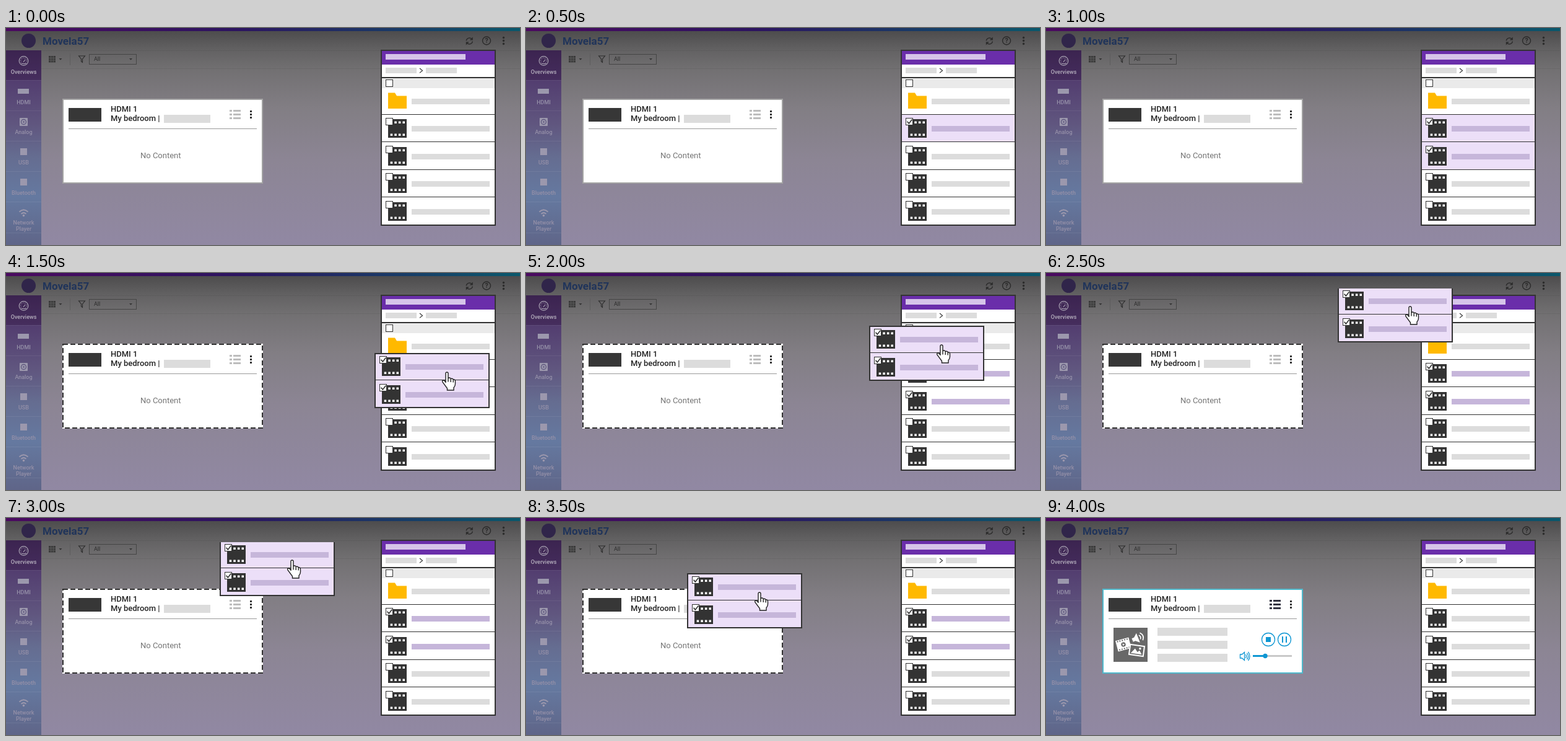
Recreate the animation shown at these times as an HTML page. Size 830x350 px, loop 6000 ms.

```html
<!DOCTYPE html>
<html lang="en">
<head>
<meta charset="utf-8">
<title>Drag files to a zone</title>
<style>
html, body { margin: 0; width: 100%; height: 100%; overflow: hidden; }
svg { display: block; width: 830px; height: 350px; font-family: Roboto, sans-serif; }
.line { fill: none; stroke: #2b2b2b; stroke-width: 1.4; }
</style>
</head>
<body>
<svg id="stage" viewBox="0 0 830 350" xmlns="http://www.w3.org/2000/svg">
  <defs>
    <linearGradient id="strip">
      <stop offset="0" stop-color="#4b0a60"/><stop offset=".45" stop-color="#2c1460"/><stop offset="1" stop-color="#0a586c"/>
    </linearGradient>
    <linearGradient id="page" gradientUnits="userSpaceOnUse" x1="0" y1="5" x2="0" y2="350">
      <stop offset="0" stop-color="#4d4c4d"/><stop offset=".09" stop-color="#636263"/>
      <stop offset=".18" stop-color="#727072"/><stop offset=".36" stop-color="#827e84"/>
      <stop offset=".6" stop-color="#8c8594"/><stop offset="1" stop-color="#9188a3"/>
    </linearGradient>
    <linearGradient id="side" gradientUnits="userSpaceOnUse" x1="0" y1="36" x2="0" y2="350">
      <stop offset="0" stop-color="#412b57"/><stop offset=".16" stop-color="#533e70"/>
      <stop offset=".38" stop-color="#60567f"/><stop offset=".55" stop-color="#656d91"/>
      <stop offset=".75" stop-color="#6579a0"/><stop offset="1" stop-color="#5f6588"/>
    </linearGradient>
  </defs>

  <rect width="830" height="350" fill="url(#page)"/>
  <rect width="830" height="5" fill="url(#strip)"/>
  <path d="M57 36.5H830M57 65.5H830" stroke="#000" stroke-opacity=".06"/>
  <circle cx="36.500" cy="20.500" r="11.500" fill="#30254a"/>
  <text x="59" y="27" font-size="17" font-weight="700" fill="#20345a">Movela57</text>

  <!-- header tools -->
  <g class="line">
    <path d="M743.300 20.500a5 5 0 0 1 8.500-3M753.300 21.500a5 5 0 0 1-8.500 3"/>
    <circle cx="776" cy="20.500" r="6.500"/>
  </g>
  <path d="M753.800 14.500v5h-5zM742.800 27.500v-5h5z" fill="#2b2b2b"/>
  <text x="776" y="24.300" font-size="10.500" font-weight="700" text-anchor="middle" fill="#2b2b2b">?</text>
  <g fill="#2b2b2b"><circle cx="803.500" cy="15.500" r="1.700"/><circle cx="803.500" cy="20.500" r="1.700"/><circle cx="803.500" cy="25.500" r="1.700"/></g>

  <!-- toolbar -->
  <rect x="69" y="45" width="11" height="10.500" fill="#3a3a3a"/>
  <path d="M72.700 45v10.500M76.300 45v10.500M69 48.500h11M69 52h11" stroke="#666" stroke-width=".7"/>
  <path d="M85.500 49h5l-2.500 2.800zM199 49h5l-2.500 2.800z" fill="#333"/>
  <path d="M103.500 41v19" stroke="#5d5d5d"/>
  <path d="M117.500 45h10l-4 5v5.500l-2-1.500v-4z" class="line" style="stroke-width:1.100"/>
  <rect x="134.500" y="42.500" width="76" height="16" fill="none" stroke="#454545"/>
  <text x="142" y="53.300" font-size="9" fill="#2b2b2b">All</text>

  <!-- sidebar -->
  <rect y="36" width="57" height="314" fill="url(#side)"/>
  <rect y="36" width="57" height="48" fill="#351c48" fill-opacity=".45"/>
  <path d="M0 84.500h57M0 133.500h57M0 182.500h57M0 231.500h57M0 280.500h57M0 330.500h57" stroke="#fff" stroke-opacity=".07"/>
  <g fill="none" stroke="#a69fb0" stroke-width="1.200">
    <circle cx="28.500" cy="53" r="7.300"/>
    <circle cx="28.500" cy="53" r="4.800" stroke-dasharray="1 2"/>
    <path d="M28 55l3-4M24.500 57.500h8"/>
  </g>
  <g fill="#9c98ad">
    <rect x="19" y="98" width="18" height="8"/>
    <rect x="23" y="194" width="11" height="11"/>
    <rect x="23" y="243" width="11" height="11"/>
    <rect x="22" y="145" width="13" height="13" rx="1"/>
    <circle cx="28.500" cy="302.500" r="1.700"/>
  </g>
  <circle cx="28.500" cy="151.500" r="4" fill="none" stroke="#60597f" stroke-width="1.300"/>
  <circle cx="28.500" cy="151.500" r="1.300" fill="#60597f"/>
  <path d="M21.500 296.500q7-6.500 14 0M24.500 299.800q4-3.700 8 0" fill="none" stroke="#9c98ad" stroke-width="1.800"/>
  <g id="menu" font-size="9" font-weight="500" text-anchor="middle"></g>

  <!-- zone card -->
  <rect x="91" y="114" width="324" height="137" fill="#fff"/>
  <rect id="edge" x="92" y="115" width="322" height="135" fill="none" stroke-width="2"/>
  <rect x="101" y="129" width="53" height="22" fill="#373737"/>
  <g font-size="13" font-weight="500" fill="#222">
    <text x="169" y="135">HDMI 1</text>
    <text x="169" y="150">My bedroom |</text>
  </g>
  <rect x="255" y="140" width="75" height="13" fill="#dcdcdc"/>
  <path id="list" d="M361 133.500h4m2 0h12M361 139.500h4m2 0h12M361 145.500h4m2 0h12" stroke-width="3"/>
  <path d="M395.500 133v3m0 2v3m0 2v3" stroke="#333" stroke-width="3"/>
  <path d="M101 162.500h304" stroke="#999"/>
  <text id="empty" x="217" y="210" font-size="13" fill="#757575">No Content</text>

  <g id="player">
    <rect x="109" y="177" width="55" height="55" fill="#686868"/>
    <g transform="translate(125 204) rotate(-15)">
      <rect x="-11" y="-9" width="22" height="18" fill="#fff"/>
      <path d="M-9-6.800H10M-9 6.800H10" stroke="#686868" stroke-width="2" stroke-dasharray="2 2"/>
      <circle r="3.700" fill="#686868"/><path d="M-1.200-2l3.400 2-3.400 2z" fill="#fff"/>
    </g>
    <g transform="translate(147 194) rotate(-22)" fill="none" stroke="#fff" stroke-width="1.700">
      <path d="M-8-3h4l6-5v16l-6-5h-4z" fill="#fff" stroke="none"/>
      <path d="M4.500-3.500q3 3.500 0 7M7.500-6.500q6 6.500 0 13"/>
    </g>
    <g transform="translate(146.500 213.500) rotate(8)">
      <rect x="-11.500" y="-8" width="23" height="16" fill="#686868" stroke="#fff" stroke-width="2"/>
      <path d="M-9 5.500l6-8 4.500 5 3-3 4.500 6z" fill="#fff"/><circle cx="5" cy="-3.500" r="1.700" fill="#fff"/>
    </g>
    <path d="M180 183.500h113M180 204.500h113M180 225.500h113" stroke="#dcdcdc" stroke-width="13"/>
    <g fill="none" stroke="#0f97d3" stroke-width="1.300">
      <circle cx="359" cy="196" r="10.500"/><circle cx="385" cy="196" r="10.500"/>
      <path d="M313.500 220h3l4-3.500v13l-4-3.500h-3zM322.500 220q2 3 0 6M324.500 217.800q4 5.200 0 10.400M326.500 215.800q5 7.200 0 14.400"/>
    </g>
    <path d="M355 192h8v8h-8zM381 191h2v10h-2zM387 191h2v10h-2z" fill="#0f97d3"/>
    <path d="M334 222.500h63" stroke="#c9c9c9" stroke-width="3"/>
    <path d="M334 222.500h20" stroke="#0f97d3" stroke-width="3"/>
    <circle cx="354" cy="222.500" r="3.700" fill="#0f97d3"/>
  </g>

  <!-- file panel -->
  <rect x="606" y="36" width="184" height="282" fill="#fff" stroke="#333" stroke-width="2"/>
  <rect x="607" y="37" width="182" height="22" fill="#6a2eaa"/>
  <rect x="613" y="42" width="129" height="9" fill="#d6c5e9"/>
  <path d="M613 68.500h50M678 68.500h50" stroke="#dcdcdc" stroke-width="9"/>
  <path d="M668 65l4.500 3.700-4.500 3.700" class="line" style="stroke-width:1.100"/>
  <rect x="607" y="81" width="182" height="16" fill="#eaeaea"/>
  <path d="M607 80h182" stroke="#333" stroke-width="2"/>
  <rect x="613.500" y="83.500" width="11" height="11" fill="#fff" stroke="#333"/>
  <path d="M617 104.500h11l3 5h16v20.500h-30z" fill="#ffb900"/>
  <rect x="655" y="114" width="126" height="9" fill="#dcdcdc"/>
  <g id="rows"></g>
  <path d="M607 139.500h182M607 183.500h182M607 228.500h182M607 272.500h182" stroke="#333"/>

  <g id="drag">
    <rect x="1" y="1" width="184" height="87" fill="#ecdff8" stroke="#333" stroke-width="2"/>
    <rect id="cut" width="186" height="2" fill="#ecdff8"/>
    <path d="M2 43.500h182" stroke="#333"/>
    <g id="carried"></g>
    <path transform="translate(108 30)" d="M7 18V3q0-2 2-2t2 2v7.500q3-1.500 4.200 1 3-1 4 1.300 3.300-.5 3.300 3v4.200q0 3-2.500 6v4H9.500v-3L2 17q-1.200-3 1.500-3Q5 14 7 17zM11 10.500v6M15.200 11.500v5.500M19.200 13v4.500" fill="#fff" stroke="#222" stroke-width="1.400"/>
  </g>
</svg>
<script>
const $ = id => document.getElementById(id);
const STEP = 500, LOOP = 6000;
const LIGHT = '#ecdff8', MAUVE = '#c6b6da', GREY = '#dcdcdc';

// Card position for each step of the drag, starting at DRAG_FROM.
const DRAG_FROM = 3, DONE = 8;
const path = [[595, 129], [554, 85], [471, 23], [345, 37], [260, 89]];

const labels = [['Overviews', 74], ['HDMI', 123], ['Analog', 171], ['USB', 220],
  ['Bluetooth', 269], ['Network', 317], ['Player', 327]];
$('menu').innerHTML = labels.map(([name, y], i) =>
  `<text x="28.500" y="${y}" fill="${i ? '#9590a8' : '#b5aebd'}">${name}</text>`).join('');

function fileRow(x, y, ticked) {
  let holes = '';
  for (let i = 0; i < 4; i++) {
    const hx = 15.7 + i * 6.6;
    holes += `M${hx} 10.500h3.500v3.500h-3.500zM${hx} 30.500h3.500v3.500h-3.500z`;
  }
  return `<g transform="translate(${x} ${y})">
    <rect x="12" y="7" width="30" height="30" fill="#333"/>
    <path d="${holes}" fill="#fff"/>
    <rect class="bar" x="50" y="18" width="126" height="9" fill="${ticked ? MAUVE : GREY}"/>
    <rect x="8.500" y="5.500" width="11" height="11" fill="#fff" stroke="#333"/>
    <path class="tick" d="M10.500 10.700l2.900 3.200 5-6.500" fill="none" stroke="#333" stroke-width="1.600"
      visibility="${ticked ? 'inherit' : 'hidden'}"/></g>`;
}

$('rows').innerHTML =
  '<rect class="tint" x="607" y="140" width="182" height="43"/>' +
  '<rect class="tint" x="607" y="184" width="182" height="44"/>' +
  [140, 185, 229, 274].map(y => fileRow(605, y, false)).join('');
$('carried').innerHTML = fileRow(0, 0, true) + fileRow(0, 45, true);

const tints = $('rows').querySelectorAll('.tint');
const bars = $('rows').querySelectorAll('.bar');
const ticks = $('rows').querySelectorAll('.tick');
const show = (el, on) => el.setAttribute('visibility', on ? 'visible' : 'hidden');

function draw(step) {
  const done = step >= DONE;
  const dragging = step >= DRAG_FROM && !done;

  for (let i = 0; i < 2; i++) {
    const picked = step > i && !done;
    show(ticks[i], picked);
    bars[i].setAttribute('fill', picked ? MAUVE : GREY);
    tints[i].setAttribute('fill', picked && !dragging ? LIGHT : '#fff');
  }

  $('edge').setAttribute('stroke', done ? '#4fb9cc' : dragging ? '#333' : '#a3a3a3');
  $('edge').setAttribute('stroke-dasharray', dragging ? '8 4' : 'none');
  $('list').setAttribute('stroke', done ? '#333340' : '#bdbdbd');
  show($('empty'), !done);
  show($('player'), done);

  show($('drag'), dragging);
  if (dragging) {
    const [x, y] = path[step - DRAG_FROM];
    $('drag').setAttribute('transform', `translate(${x} ${y})`);
    // Above the zone the card's top edge is clipped away.
    $('drag').style.clipPath = y < 40 ? 'polygon(0 2px, 186px 2px, 186px 89px, 0 89px)' : 'none';
  }
  show($('cut'), false);
}

const start = performance.now();
let last = -1;
function tick() {
  const step = Math.floor((performance.now() - start) % LOOP / STEP);
  if (step !== last) draw(last = step);
  requestAnimationFrame(tick);
}
tick();
</script>
</body>
</html>
```
